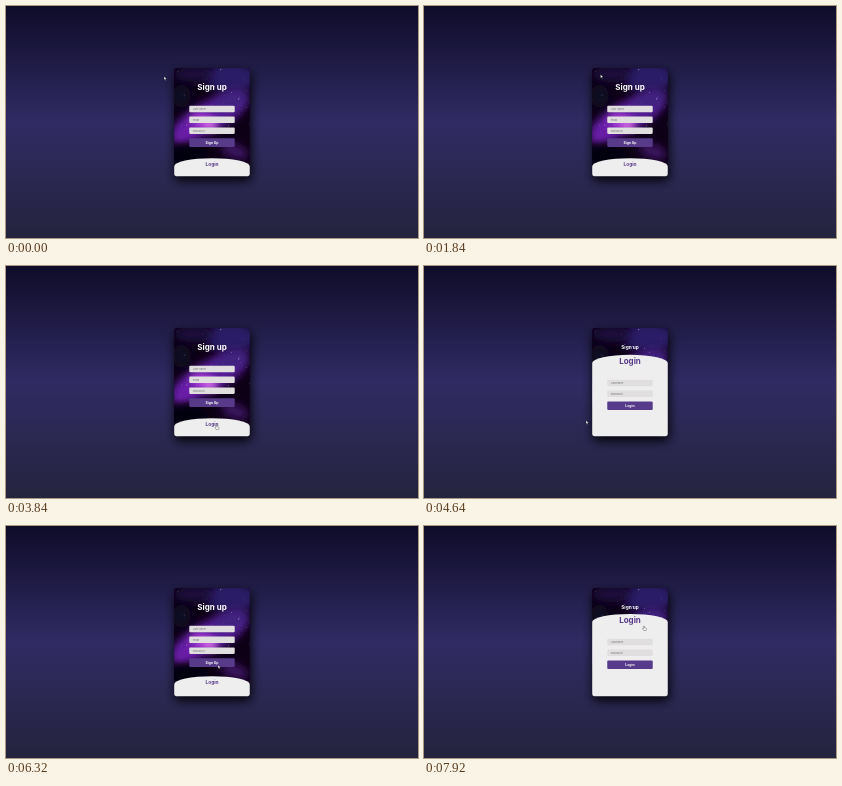
An HTML page for the animation above (8000 ms loop, 412 by 232 pixels).

```html
<!DOCTYPE html>
<html lang="en">
<head>
<meta charset="utf-8">
<title>Sign up / Login</title>
<style>
  html, body { margin: 0; height: 100%; overflow: hidden; }
  body { background: linear-gradient(#0f0c29, #302b63, #24243e); }
  svg { display: block; width: 100vw; height: 100vh; }
  text { font-family: Inter, sans-serif; }
  .title { font-size: 37px; font-weight: 700; text-anchor: middle; }
  .action { font-size: 16px; font-weight: 700; fill: #fff; text-anchor: middle; }
  .hint { font-size: 12px; fill: #777; }
</style>
</head>
<body>
<svg viewBox="0 0 412 232">
  <defs>
    <clipPath id="frame"><rect width="350" height="500" rx="10"/></clipPath>
    <filter id="shadow" x="-60%" y="-40%" width="220%" height="190%">
      <feDropShadow dx="5" dy="20" stdDeviation="25" flood-color="#000"/>
    </filter>
    <filter id="soft" x="-100%" y="-100%" width="300%" height="300%">
      <feGaussianBlur stdDeviation="20"/>
    </filter>
  </defs>
  <g transform="translate(168.1 61.9) scale(.2165)">
    <rect width="350" height="500" rx="10" fill="#0b0518" filter="url(#shadow)"/>
    <g clip-path="url(#frame)">
      <g id="sky"></g>
      <g id="signup"></g>
      <g id="login">
        <path d="M0 500V38A175 38 0 0 1 350 38V500Z" fill="#eee"/>
      </g>
    </g>
  </g>
  <g id="cursor" fill="#fff" stroke="#111" stroke-width="1.5" stroke-linejoin="round">
    <path id="arrow" d="M0 0V16L4 12.5L7 19L9.500 18L7 11.500H12Z"/>
    <path id="hand" d="M-2 1Q0-2 2 1V8L10 10Q12 11 11 15L9 21H-1L-7 12Q-6 9-2 12Z"/>
  </g>
</svg>
<script>
const LOOP = 8000, STEP = 80;
const CLICKS = [3910, 5620, 6945]; // each click toggles the login panel
const $ = id => document.getElementById(id);

function add(parent, tag, attrs, text = '') {
  const el = document.createElementNS('http://www.w3.org/2000/svg', tag);
  for (const k in attrs) el.setAttribute(k, attrs[k]);
  el.textContent = text;
  return parent.appendChild(el);
}

// Night sky: centre, radii, tilt, colour
[
  [263, 45, 120, 70, 0, '#2c1a66'],
  [90, 30, 90, 35, 0, '#1d0d3c'],
  [165, 225, 185, 70, -27, '#5a1d9c'],
  [265, 150, 85, 45, -20, '#40207f'],
  [55, 300, 75, 40, -30, '#6a1fa8'],
  [280, 385, 65, 32, 20, '#3d1263'],
  [35, 130, 45, 55, 0, '#0d0720'],
  [60, 405, 100, 45, 0, '#050210'],
  [135, 248, 60, 32, 20, '#b845e0'],
  [168, 262, 26, 15, 0, '#ff9cf5']
].forEach(([x, y, rx, ry, tilt, fill]) => add($('sky'), 'ellipse', {
  rx, ry, fill, filter: 'url(#soft)', transform: `translate(${x} ${y}) rotate(${tilt})`
}));

let seed = 11;
const random = () => (seed = seed * 16807 % 2147483647) / 2147483647;
for (let i = 0; i < 36; i++) {
  add($('sky'), 'circle', {
    cx: random() * 350, cy: random() * 330, r: 1 + random() * 1.6,
    fill: '#d9b8ff', opacity: .25 + random() * .55
  });
}

function form(parent, title, titleY, color, hints, firstY, action) {
  hints.forEach((hint, i) => {
    const y = firstY + i * 50;
    add(parent, 'rect', { x: 70, y: y - 15, width: 210, height: 30, rx: 5, fill: '#e0dede' });
    add(parent, 'text', { class: 'hint', x: 86, y: y + 4 }, hint);
  });
  const y = firstY + hints.length * 50 + 5;
  add(parent, 'rect', { x: 70, y: y - 20, width: 210, height: 40, rx: 5, fill: '#573b8a' });
  add(parent, 'text', { class: 'action', x: 175, y: y + 6 }, action);
  const label = add(parent, 'text', { class: 'title', y: 13, fill: color }, title);
  return scale => label.setAttribute('transform', `translate(175 ${titleY}) scale(${scale})`);
}
const scaleSignup = form($('signup'), 'Sign up', 90, '#fff',
  ['User name', 'Email', 'Password'], 190, 'Sign Up');
const scaleLogin = form($('login'), 'Login', 28, '#573b8a',
  ['Username', 'Password'], 130, 'Login');

// cubic-bezier(.42, 0, .58, 1)
function easeInOut(x) {
  let lo = 0, hi = 1, u = .5;
  for (let i = 0; i < 24; i++) {
    u = (lo + hi) / 2;
    const bx = 1.26 * u * (1 - u) ** 2 + 1.74 * u * u * (1 - u) + u ** 3;
    if (bx < x) lo = u; else hi = u;
  }
  return u * u * (3 - 2 * u);
}

function openness(t, duration) {
  const past = CLICKS.filter(c => c <= t);
  if (!past.length) return 0;
  const k = easeInOut(Math.min(1, (t - past[past.length - 1]) / duration));
  return past.length % 2 ? k : 1 - k;
}

// Pointer path: time, x, y, hand
const PATH = [
  [0, 158, 70.5, 0], [800, 186, 60, 0], [1360, 190, 49, 0], [1840, 176.5, 68.5, 0],
  [2240, 265, 62, 0], [2640, 235, 100, 0], [3440, 212, 160, 1], [3840, 210.5, 159, 1],
  [4000, 210, 159, 0], [4640, 162, 154.5, 0], [5300, 206, 82, 1], [5680, 206, 82, 0],
  [6320, 212, 139, 0], [6800, 208, 159, 1], [7360, 208, 160.5, 1], [7920, 220, 100, 1],
  [8000, 220, 100, 1]
];
function moveCursor(t) {
  const i = PATH.findIndex(p => p[0] > t);
  const [t0, x0, y0, hand] = PATH[i - 1], [t1, x1, y1] = PATH[i];
  const u = (t - t0) / (t1 - t0), k = u * u * (3 - 2 * u);
  $('cursor').setAttribute('transform',
    `translate(${x0 + (x1 - x0) * k} ${y0 + (y1 - y0) * k}) scale(.2165)`);
  $('arrow').style.display = hand ? 'none' : '';
  $('hand').style.display = hand ? '' : 'none';
}

const start = performance.now();
function draw(now) {
  const t = Math.floor(Math.max(0, now - start) % LOOP / STEP) * STEP;
  const label = openness(t, 500);
  $('login').setAttribute('transform', `translate(0 ${417 - 297 * openness(t, 800)})`);
  scaleSignup(1 - .4 * label);
  scaleLogin(.6 + .4 * label);
  moveCursor(t);
  requestAnimationFrame(draw);
}
draw(start);
</script>
</body>
</html>
```
